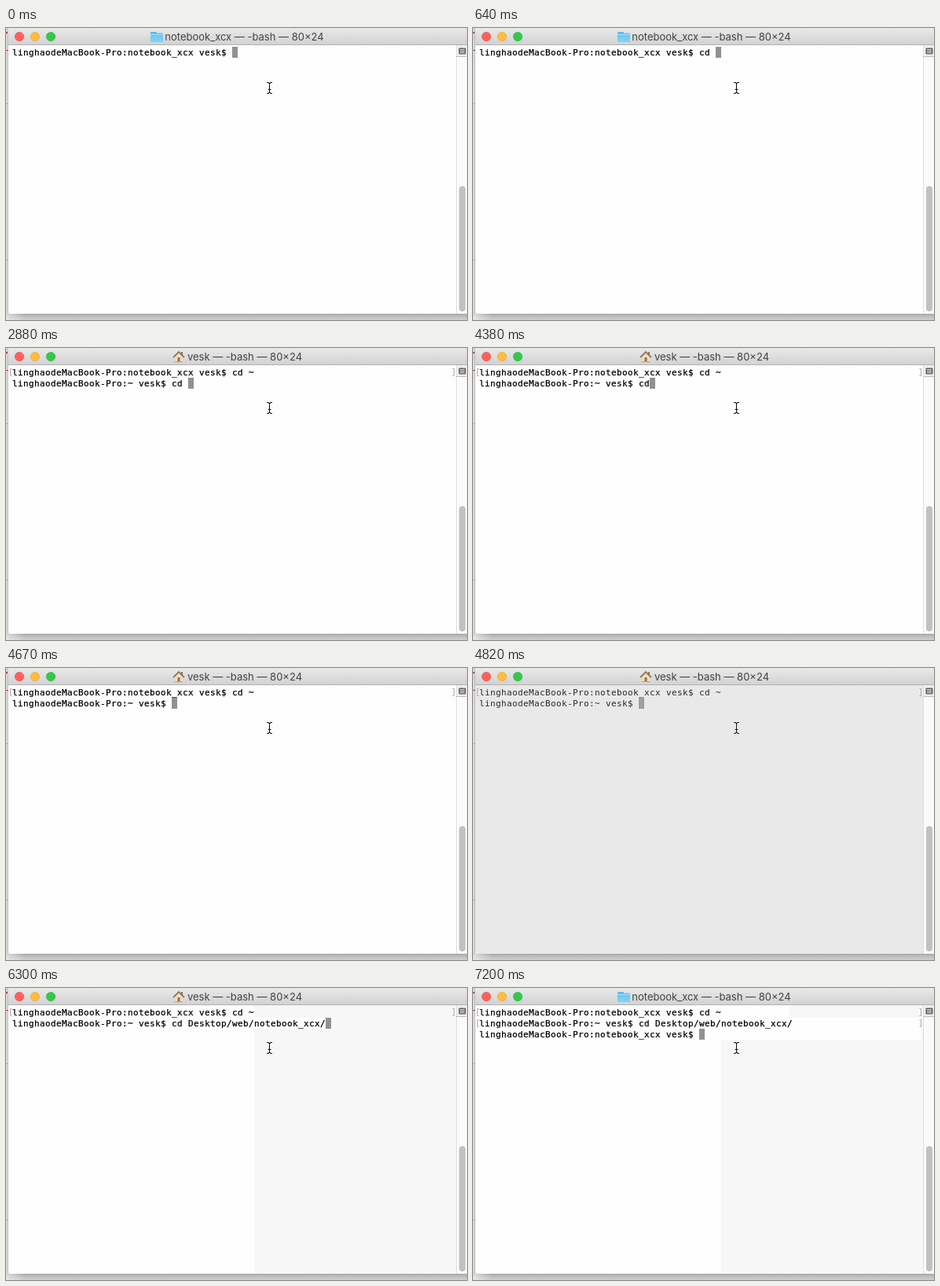
An HTML page with a canvas that plays this animation: 587x373 px, repeating every 8000 ms.

```html
<!DOCTYPE html>
<html lang="en">
<head>
<meta charset="utf-8">
<title>Terminal</title>
<style>
  html, body { margin: 0; width: 100%; height: 100%; overflow: hidden; background: #e4e4e4; }
  canvas { display: block; width: 587px; height: 373px; }
</style>
</head>
<body>
<canvas id="stage"></canvas>
<script>
const W = 587, H = 373, LOOP = 8000;
const CELL = 7, LINE = 14, LEFT = 8, TOP = 24;
const PAPER = '#fefefe', FADING = '#f7f7f7', FLASH = '#e9e9e9';

const canvas = document.getElementById('stage');
const ratio = window.devicePixelRatio || 1;
canvas.width = W * ratio;
canvas.height = H * ratio;
const ctx = canvas.getContext('2d');
ctx.scale(ratio, ratio);

const HOST = 'linghaodeMacBook-Pro', USER = 'vesk', DIR = 'notebook_xcx';
const inDir = `${HOST}:${DIR} ${USER}$ `;
const inHome = `${HOST}:~ ${USER}$ `;
const path = 'cd Desktop/web/notebook_xcx/';

// Each step: start time, then the lines on screen; the cursor follows the last one.
const first = inDir + 'cd ~';
const home = typed => [first, inHome + typed];
const steps = [
  [0, [inDir]],
  [500, [inDir + 'c']],
  [640, [inDir + 'cd ']],
  [1690, [first]],
  [1990, home('')],
  [2730, home('cd')],
  [2880, home('cd ')],
  [4380, home('cd')],
  [4530, home('c')],
  [4670, home('')],
  [5120, home('c')],
  [5410, home('cd De')],
  [6010, home('cd Des')],
  [6300, home(path)],
  [7050, [...home(path), '']],
  [7200, [...home(path), inDir]]
];

function rect(x, y, w, h, color) {
  ctx.fillStyle = color;
  ctx.fillRect(x, y, w, h);
}

function rounded(x, y, w, h, r, color) {
  ctx.fillStyle = color;
  ctx.beginPath();
  ctx.roundRect(x, y, w, h, r);
  ctx.fill();
}

function shape(color, ...points) {
  ctx.fillStyle = color;
  ctx.beginPath();
  points.forEach(([x, y]) => ctx.lineTo(x, y));
  ctx.fill();
}

function line(color, width, ...points) {
  ctx.strokeStyle = color;
  ctx.lineWidth = width;
  ctx.beginPath();
  points.forEach(([x, y], i) => i ? ctx.lineTo(x, y) : ctx.moveTo(x, y));
  ctx.stroke();
}

function fade(x0, y0, x1, y1, ...colors) {
  const g = ctx.createLinearGradient(x0, y0, x1, y1);
  colors.forEach((c, i) => g.addColorStop(i / (colors.length - 1), c));
  return g;
}

function drawDesktop() {
  rect(0, 0, W, H, '#f1f1f1');
  rect(0, 22, 3, 74, '#f5f5f5');
  rect(0, 96, 3, 1, '#cfcfcf');
  rect(0, 296, 3, 1, '#cfcfcf');
  rect(0, 5, 2, 2, '#e04a44');
  rect(0, 28, 3, 1, '#d8433e');
  rect(0, 0, 3, H, fade(0, 0, 3, 0, 'rgba(0,0,0,.06)', 'rgba(0,0,0,.22)'));
  rect(0, 365, W, 8, fade(0, 365, 0, 373, '#a9a9a9', '#c0c0c0', '#d0d0d0'));
  rect(0, 365, 24, 8, fade(0, 0, 24, 0, 'rgba(240,240,240,.7)', 'rgba(240,240,240,0)'));
}

function drawFolder() {
  rounded(184, 5, 8, 5, 1, '#55b4e4');
  rounded(184, 6.5, 16, 11.5, 1, fade(0, 6, 0, 18, '#64c1ef', '#83d4f7'));
  rect(184, 8, 16, 1, '#a0e0fa');
}

function drawHouse() {
  rect(223, 5, 2, 5, '#a4684c');
  shape('#eadfc4', [215, 11], [220, 6], [225, 11], [225, 18], [215, 18]);
  rect(218.5, 12, 3, 6, '#a66c3d');
  line('#8f755f', 1.8, [213, 12], [220, 5], [227, 12]);
  line('#a5a394', 1, [215, 17.5], [225, 17.5]);
}

function drawTitleBar(atHome) {
  rounded(3, 0, W, 22, [5, 0, 0, 0], fade(0, 0, 0, 22, '#e9e9e9', '#d1d1d1'));
  rect(3, 21, W, 1, '#b3b3b3');
  [['#fc605c', '#e0443e'], ['#fdbc40', '#dea034'], ['#34c84a', '#27aa35']].forEach(([fill, edge], i) => {
    ctx.beginPath();
    ctx.arc(17 + 20 * i, 11, 5.75, 0, 7);
    ctx.fillStyle = fill;
    ctx.fill();
    ctx.strokeStyle = edge;
    ctx.lineWidth = 0.5;
    ctx.stroke();
  });
  if (atHome) drawHouse(); else drawFolder();
  ctx.font = '13px Inter, "Liberation Sans", sans-serif';
  ctx.textAlign = 'center';
  ctx.fillStyle = '#424242';
  ctx.fillText(`${atHome ? USER : DIR} — -bash — 80×24`, atHome ? 304 : 303.5, 16);
}

function drawPaper(t) {
  const flashing = t >= 4820 && t < 4970;
  rounded(3, 22, 570, 343, [0, 0, 0, 4], flashing ? FLASH : PAPER);
  if (t < 4970) return;
  rect(316, 22, 257, 343, FADING);
  if (t >= 6300) rect(316, 38, 98, 14, PAPER);
  if (t >= 7050) rect(316, 38, 255, 28, PAPER);
  if (t >= 7200) rect(316, 22, 87, 44, PAPER);
}

function drawScrollbar() {
  rect(573, 22, 14, 343, '#fafafa');
  rect(573, 22, 1, 343, '#dedede');
  rect(574, 22, 13, 14, '#f0f0f0');
  rect(573, 36, 14, 1, '#bdbdbd');
  rounded(576.5, 25.5, 9, 8, 1, '#5c5c5c');
  rect(578, 27, 6, 1, '#e8e8e8');
  rect(578, 29, 6, 1, '#e8e8e8');
  rect(578, 31, 6, 1, '#e8e8e8');
  rounded(577, 202, 8, 160, 4, '#c1c1c1');
}

function drawMark(row) {
  const top = TOP + row * LINE + 2.5, bottom = top + 9;
  line('#ababab', 1, [7.5, top], [5.5, top], [5.5, bottom], [7.5, bottom]);
  line('#ababab', 1, [568.5, top], [570.5, top], [570.5, bottom], [568.5, bottom]);
}

function drawLines(lines, t) {
  const flashing = t >= 4820 && t < 4970;
  const last = lines.length - 1;
  rect(LEFT + lines[last].length * CELL, TOP + last * LINE, CELL, LINE, flashing ? '#9f9f9f' : '#919191');
  ctx.font = '11px "DejaVu Sans Mono", monospace';
  ctx.textAlign = 'left';
  ctx.fillStyle = ctx.strokeStyle = flashing ? '#282828' : '#000';
  ctx.lineWidth = 0.25;
  lines.forEach((text, row) => {
    [...text].forEach((char, col) => {
      const x = LEFT + col * CELL, y = TOP + row * LINE + 11;
      ctx.fillText(char, x, y);
      if (!flashing) ctx.strokeText(char, x, y);
    });
  });
  for (let row = 0; row < last; row++) drawMark(row);
}

function drawPointer() {
  const beam = [
    [[332, 69.5], [334, 69.5], [335.5, 71], [337, 69.5], [339, 69.5]],
    [[335.5, 71], [335.5, 82]],
    [[332, 83.5], [334, 83.5], [335.5, 82], [337, 83.5], [339, 83.5]],
    [[333.5, 78.5], [337.5, 78.5]]
  ];
  beam.forEach(part => line('#fff', 2.6, ...part));
  beam.forEach(part => line('#111', 1.1, ...part));
}

function draw(t) {
  const lines = steps.findLast(([start]) => t >= start)[1];
  drawDesktop();
  drawTitleBar(t >= 1990 && t < 7200);
  drawPaper(t);
  drawScrollbar();
  drawLines(lines, t);
  drawPointer();
}

const begin = performance.now();
function tick() {
  draw((performance.now() - begin) % LOOP);
  requestAnimationFrame(tick);
}
tick();
</script>
</body>
</html>
```
